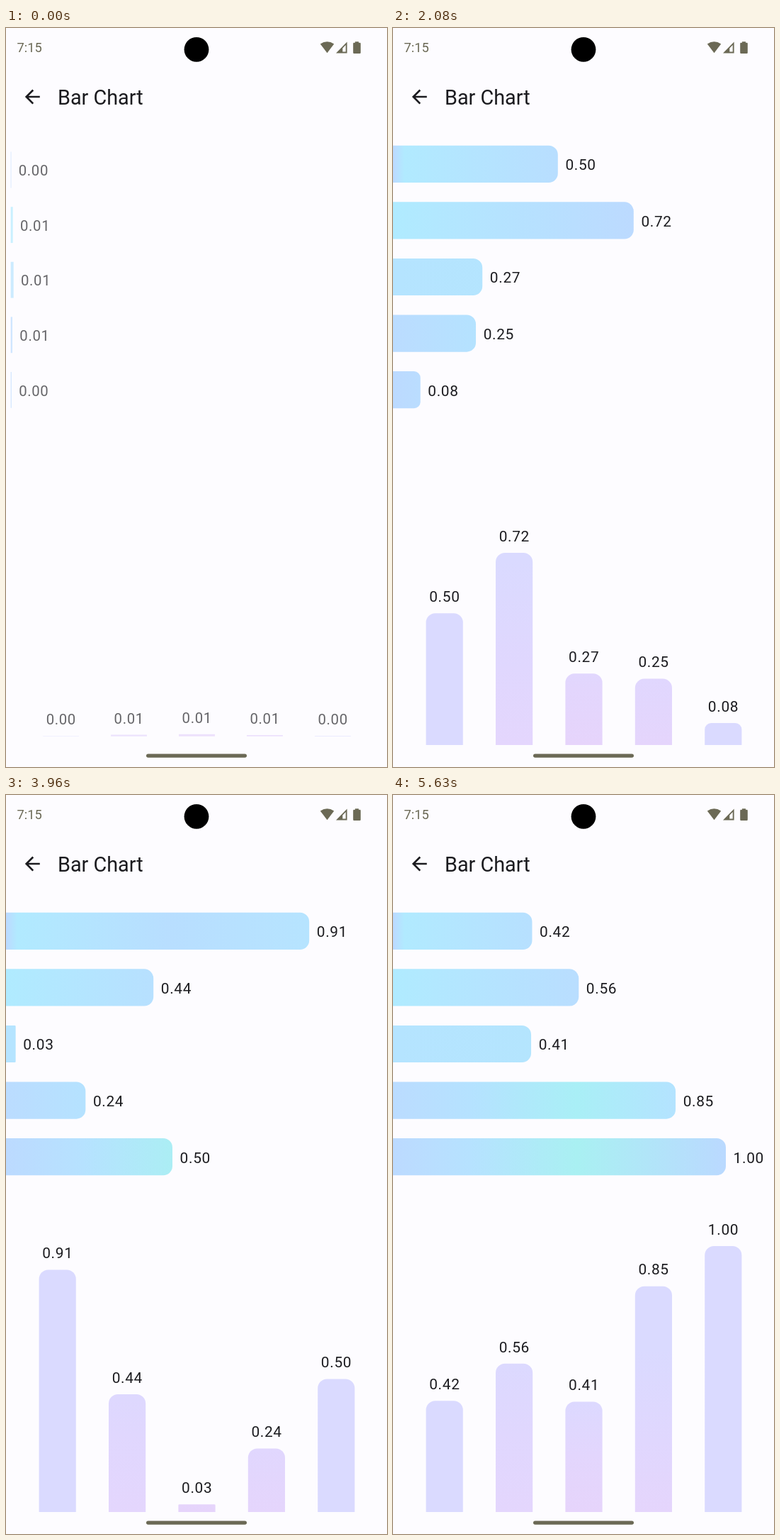
An HTML page that plays this animation: 538x1042 px, repeating every 5.68 s.

```html
<!DOCTYPE html>
<html lang="en">
<head>
<meta charset="utf-8">
<title>Bar Chart</title>
<style>
  html, body { margin: 0; width: 100%; height: 100%; overflow: hidden; background: #fdfcff; }
  svg { display: block; width: 100vw; height: 100vh; }
  text { font-family: Roboto, "Noto Sans", sans-serif; fill: #1b1b1f; }
  .label { font-size: 20.9px; letter-spacing: .65px; }
  .status { fill: #6b6955; }
</style>
</head>
<body>
<svg id="stage" viewBox="0 0 538 1042" xmlns="http://www.w3.org/2000/svg">
  <defs id="defs"></defs>
  <rect width="538" height="1042" fill="#fdfcff"/>
  <text class="status" x="15.5" y="34.3" font-size="18.3">7:15</text>
  <circle cx="269" cy="30.3" r="17.4"/>
  <g class="status">
    <path d="M443.8 22.6Q453.5 15.8 463.2 22.6L453.5 35.2Z"/>
    <path fill-rule="evenodd" d="M466 35.4L481.6 19.6V35.4ZM475.3 33.6H479.7V24.1L475.3 28.6Z"/>
    <path d="M493 19.2h5v1.6h1.6q1.2 0 1.2 1.2v12.8q0 1.2 -1.2 1.2h-8.2q-1.2 0 -1.2 -1.2v-12.8q0 -1.2 1.2 -1.2h1.6z"/>
  </g>
  <path transform="translate(21.6 81.3) scale(1.309)" fill="#1b1b1f"
    d="M20 11H7.83l5.59-5.59L12 4l-8 8 8 8 1.41-1.41L7.83 13H20v-2z"/>
  <text x="73" y="107.7" font-size="28.8">Bar Chart</text>
  <g id="chart"></g>
  <rect class="status" x="198" y="1023.4" width="142" height="5.4" rx="2.7"/>
</svg>
<script>
const LOOP = 5680, TWEEN = 800;
const THICK = 52.2, LENGTH = 470, HEIGHT = 375, FLOOR = 1011;

// Each data set starts to come in at its own time.
const steps = [
  { at: -33, values: [.038, .154, .206, .121, .061] },
  { at: 1512, values: [.681, .954, .294, .301, .091] },
  { at: 3044, values: [.911, .443, .029, .239, .5] },
  { at: 4477, values: [.418, .558, .415, .849, 1] }
];

// Gradient stops as [position in px, colour].
const rowStops = [
  [[0, '#bcd9ff'], [16, '#b1eaff'], [230, '#b8deff'], [430, '#b6e4ff']],
  [[0, '#b0ebff'], [150, '#b5e3ff'], [340, '#bcdaff']],
  [[0, '#b5e4ff'], [200, '#b4e5fe']],
  [[0, '#bbdcff'], [110, '#b5e2ff'], [260, '#a9eff6'], [400, '#b4e3ff']],
  [[0, '#bcdaff'], [110, '#b6e2ff'], [260, '#a9f0f2'], [470, '#bad9ff']]
];
const columnStops = [
  [[0, '#dadaff']],
  [[0, '#e4d6fd'], [110, '#e0d7fe'], [260, '#dadaff']],
  [[0, '#e6d4fb'], [80, '#e3d6fd'], [160, '#dcd9ff']],
  [[0, '#e5d5fc'], [100, '#e0d7fe'], [230, '#dadaff']],
  [[0, '#dadaff']]
];

const defs = document.getElementById('defs');
const chart = document.getElementById('chart');

function make(tag, attrs, parent) {
  const node = document.createElementNS('http://www.w3.org/2000/svg', tag);
  for (const key in attrs) node.setAttribute(key, attrs[key]);
  return parent.appendChild(node);
}

function gradient(id, stops, line, span) {
  const node = make('linearGradient', { id, gradientUnits: 'userSpaceOnUse', ...line }, defs);
  for (const [pos, color] of stops) make('stop', { offset: pos / span, 'stop-color': color }, node);
  return `url(#${id})`;
}

const rows = rowStops.map((stops, i) => {
  const fill = gradient('row' + i, stops, { x1: 0, y1: 0, x2: LENGTH, y2: 0 }, LENGTH);
  const top = 165.8 + 79.55 * i;
  return {
    top,
    bar: make('path', { fill }, chart),
    label: make('text', { class: 'label', y: top + 34.5 }, chart)
  };
});

const columns = columnStops.map((stops, i) => {
  const line = { x1: 0, y1: FLOOR, x2: 0, y2: FLOOR - HEIGHT };
  const fill = gradient('column' + i, stops, line, HEIGHT);
  const left = 46.6 + 98.4 * i;
  return {
    left,
    bar: make('path', { fill }, chart),
    label: make('text', { class: 'label', x: left + THICK / 2 + .2, 'text-anchor': 'middle' }, chart)
  };
});

const clamp = x => Math.min(1, Math.max(0, x));

function valuesAt(t) {
  let now = [0, 0, 0, 0, 0];
  for (const { at, values } of steps) {
    const p = clamp((t - at) / TWEEN);
    now = now.map((v, i) => v + (values[i] - v) * p);
  }
  return now;
}

const radius = (v, size) => Math.min(size, 13 * clamp((v - .02) / .09));

function drawRow({ top, bar, label }, v) {
  const w = v * LENGTH, r = radius(v, w);
  bar.setAttribute('d', `M0 ${top}H${w - r}a${r} ${r} 0 0 1 ${r} ${r}` +
    `v${THICK - 2 * r}a${r} ${r} 0 0 1 ${-r} ${r}H0Z`);
  label.setAttribute('x', w + 10.6);
  label.textContent = v.toFixed(2);
}

function drawColumn({ left, bar, label }, v) {
  const h = v * HEIGHT, r = radius(v, h), top = FLOOR - h;
  bar.setAttribute('d', `M${left} ${FLOOR}V${top + r}a${r} ${r} 0 0 1 ${r} ${-r}` +
    `h${THICK - 2 * r}a${r} ${r} 0 0 1 ${r} ${r}V${FLOOR}Z`);
  label.setAttribute('y', top - 16.2);
  label.textContent = v.toFixed(2);
}

function draw(t) {
  const values = valuesAt(t);
  rows.forEach((row, i) => drawRow(row, values[i]));
  columns.forEach((column, i) => drawColumn(column, values[i]));

  // The chart settles into place as the screen opens.
  const left = (1 - clamp(t / 220)) ** 2;
  const scale = 1 - .025 * left;
  chart.setAttribute('transform', `translate(269 521) scale(${scale}) translate(-269 -521)`);
  chart.setAttribute('opacity', 1 - .33 * (1 - clamp(t / 150)));
}

const start = performance.now();
function tick() {
  draw((performance.now() - start) % LOOP);
  requestAnimationFrame(tick);
}
draw(0);
requestAnimationFrame(tick);
</script>
</body>
</html>
```
